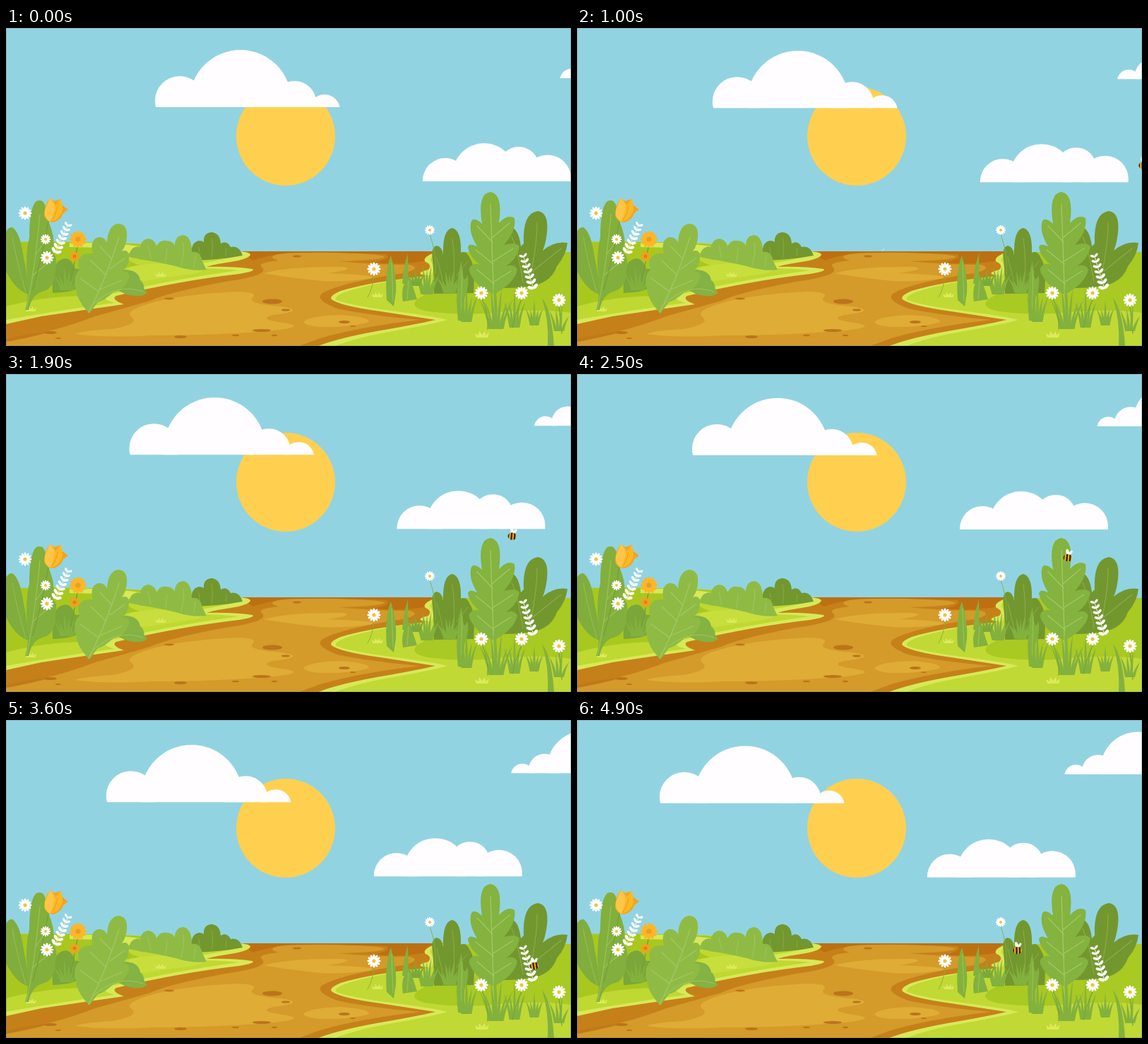
An HTML page with a canvas that plays this animation: 800 by 450 pixels, repeating every 5 s.

```html
<!DOCTYPE html>
<html lang="en">
<head>
<meta charset="utf-8">
<title>Meadow</title>
<style>
html, body { margin: 0; width: 100%; height: 100%; overflow: hidden; background: #92d3e2; }
canvas { display: block; width: 800px; height: 450px; }
</style>
</head>
<body>
<canvas id="stage" width="800" height="450"></canvas>
<script>
const W = 800, H = 450, LOOP = 5000, TAU = Math.PI * 2;
const view = document.getElementById('stage').getContext('2d');
const ground = document.createElement('canvas');
ground.width = W;
ground.height = H;
let c = ground.getContext('2d');

const DARK = '#73972f', LEAF = '#84b33f', LIGHT = '#8fbb45', BLADE = '#83b13e', VEIN = '#a3c866';

function fill(color, d) {
  c.fillStyle = color;
  c.fill(new Path2D(d));
}

function line(color, width, d) {
  c.strokeStyle = color;
  c.lineWidth = width;
  c.lineCap = 'round';
  c.stroke(new Path2D(d));
}

function oval(color, x, y, rx, ry, turn = 0) {
  c.fillStyle = color;
  c.beginPath();
  c.ellipse(x, y, rx, ry, turn, 0, TAU);
  c.fill();
}

function blade(color, x, y, tipX, tipY, w) {
  const mx = (x + tipX) / 2, my = (y + tipY) / 2, lean = (tipX - x) * 0.25;
  fill(color, `M${x - w / 2} ${y}Q${mx - w / 2 - lean} ${my} ${tipX} ${tipY}Q${mx + w / 2 - lean} ${my} ${x + w / 2} ${y}Z`);
}

function fan(color, x, y, tall, wide, count) {
  for (let i = 0; i < count; i++) {
    const k = i / (count - 1) * 2 - 1;
    const h = tall * (1 - 0.35 * Math.abs(k) - 0.18 * (i % 2));
    blade(color, x + k * wide * 0.35, y, x + k * wide, y - h, 4.2);
  }
}

function tuft(x, y, s = 1) {
  fill('#dcea5c', `M${x - 8 * s} ${y}L${x - 10 * s} ${y - 6 * s}L${x - 5 * s} ${y - 3 * s}L${x - 4 * s} ${y - 9 * s}
    L${x} ${y - 4 * s}L${x + 4 * s} ${y - 9 * s}L${x + 5 * s} ${y - 3 * s}L${x + 10 * s} ${y - 7 * s}L${x + 8 * s} ${y}Z`);
}

function petals(x, y, r, count, color, w) {
  for (let i = 0; i < count; i++) {
    const a = i * TAU / count;
    oval(color, x + Math.cos(a) * r * 0.6, y + Math.sin(a) * r * 0.6, r * 0.4, r * w, a);
  }
}

function daisy(x, y, r) {
  petals(x, y, r, 12, '#fff', 0.17);
  oval('#fff', x, y, r * 0.65, r * 0.65);
  oval('#f6bf3c', x, y, r * 0.27, r * 0.27);
}

function sprig(x, y, tipX, tipY) {
  line('#eef5e4', 1, `M${x} ${y}L${tipX} ${tipY}`);
  const a = Math.atan2(tipY - y, tipX - x);
  for (let i = 0; i < 7; i++) {
    const k = i / 6, s = 1 - k * 0.25;
    const px = x + (tipX - x) * k, py = y + (tipY - y) * k;
    for (const side of [-1, 1]) {
      const b = a + side * 0.95;
      oval('#fff', px + Math.cos(b) * 4.6 * s, py + Math.sin(b) * 4.6 * s, 4.3 * s, 2.2 * s, b);
    }
  }
}

function road() {
  fill('#c68019', 'M0 316H620V450H0Z');
  fill('#bd7011', 'M330 316H615V325Q570 337 520 332Q548 326 538 320Q480 318 400 318Q370 322 350 329Z');
  fill('#d49a2a', `M386 320Q430 316 490 319Q532 320 536 324Q528 329 470 330Q520 335 572 335
    Q590 340 562 347Q470 361 447 376Q437 385 469 397Q510 406 586 413Q500 423 445 439L415 450
    H0V441Q70 430 126 408Q166 397 204 386Q230 374 310 359Q376 350 362 338Q355 332 386 329Q368 324 386 320Z`);
  fill('#dfac36', `M98 433Q110 428 150 426Q190 419 178 409Q166 401 202 390Q245 377 326 373
    Q360 373 348 383Q345 391 390 394Q428 400 379 406Q352 412 398 418Q424 423 380 428Q300 435 206 435Q140 439 98 433Z`);
  fill('#dfac36', 'M365 347Q400 337 476 338Q498 341 456 347Q540 350 512 355Q466 361 437 357Q390 352 365 347Z');
  fill('#dfac36', 'M421 416Q430 407 474 406Q515 409 514 416Q490 424 447 423Q424 422 421 416Z');
  fill('#c0791b', 'M0 440Q36 431 67 429Q26 440 0 444Z');
  [[377, 387, 14, 3.4], [396, 399, 6, 1.6], [231, 383, 7, 1.4], [247, 437, 9, 2], [63, 431, 9, 2],
   [362, 428, 13, 2], [380, 435, 4, 1.2], [74, 439, 4, 1], [479, 416, 8, 2], [325, 435, 5, 1.2],
   [412, 323, 6, 1.6], [491, 422, 4, 1]].forEach(s => oval('#bb741b', ...s));
}

function leftBank() {
  fill('#d7e958', `M0 303Q120 301 205 306L330 316Q346 317 346 321Q343 327 318 331Q292 335 284 338
    Q320 337 349 341Q354 344 330 348Q250 357 156 379Q148 384 167 391Q110 399 50 408L0 419Z`);
  fill('#bfd832', `M0 303Q120 301 205 306L326 316Q340 319 326 323Q302 329 270 334Q252 338 270 340
    Q304 340 330 343Q245 354 150 376Q128 382 154 389Q90 397 0 413Z`);
  fill('#a8c81f', `M0 303Q90 301 180 305L318 317Q280 328 240 329Q205 328 172 323Q170 330 190 336
    Q160 339 120 348Q160 354 190 360Q150 371 110 379Q50 380 0 394Z`);
  fill('#d7e958', 'M90 304Q150 303 190 309Q184 314 176 319Q150 310 90 310Z');
  fill('#c8de3d', 'M176 338Q214 329 265 338Q292 343 262 348Q220 354 196 358Q160 350 176 338Z');
  tuft(219, 352, 0.8);
  tuft(35, 401, 0.8);
}

function rightBank() {
  fill('#d7e958', `M800 317H608Q588 325 594 331Q604 335 598 342Q574 348 600 351Q520 358 474 372
    Q457 379 461 384Q472 393 530 401L608 413Q578 420 525 429Q470 439 442 450H800Z`);
  fill('#c1d934', `M800 318H614Q596 326 602 331Q609 339 602 350Q520 360 479 374Q463 381 468 385
    Q490 393 545 400Q606 408 625 413Q600 420 548 429Q496 438 466 450H800Z`);
  fill('#a9c923', 'M800 317H622Q607 330 614 350Q608 370 582 384Q570 396 598 401Q650 408 710 401Q760 397 800 403Z');
  tuft(526, 381, 0.8);
  tuft(674, 438);
}

function farBushes() {
  fill(DARK, `M262 329Q260 303 273 301Q278 301 280 303Q279 290 291 289Q303 290 304 305
    Q313 300 318 310Q330 307 335 322Q305 328 262 329Z`);
  line('#8dac49', 0.8, 'M291 325Q294 308 291 298M311 322L312 312M275 326L273 310');
  fill(LIGHT, `M188 327Q187 300 201 298Q211 299 213 309Q218 299 227 301Q236 301 239 308
    Q239 294 251 293Q263 295 263 317Q275 315 278 330L284 342Q265 345 240 337Q210 330 188 327Z`);
  fill(LIGHT, 'M174 324Q175 310 188 309L194 328Z');
  line(VEIN, 0.8, 'M248 336Q253 318 251 304M226 332L228 312M205 326L201 308M266 338L268 323');
}

function leftPlants() {
  fill('#7ba63a', 'M66 375Q64 336 76 329Q91 320 98 341Q113 338 108 362Q102 374 66 375Z');
  fan(BLADE, 86, 371, 36, 20, 6);
  fill('#80ad3c', 'M0 288Q4 281 9 282Q20 289 25 325Q31 353 32 377Q14 372 0 344Z');
  line('#98bf56', 1, 'M9 296Q15 330 28 374');
  fill('#83af3c', `M27 399Q33 382 30 354Q27 320 33 296Q33 254 43 245Q56 240 57 262Q60 274 64 284
    Q70 302 66 318Q74 324 70 342Q70 369 51 373Q36 378 32 399Z`);
  line('#9cc25a', 1.2, 'M29 398Q40 349 48 264M38 350L60 332M43 319L60 296');

  fill('#84b243', 'M145 365Q153 344 169 342Q188 343 190 357Q195 360 196 370L200 375Q190 383 168 376Z');
  fill(LIGHT, `M118 404Q101 386 99 370Q94 350 104 342Q98 326 111 320Q121 318 123 319
    Q118 301 130 296Q140 295 143 304Q144 280 158 277Q173 277 171 297Q170 308 164 316Q174 312 174 324
    Q174 339 164 344Q176 344 174 354Q168 371 152 374Q139 386 130 388Z`);
  line(VEIN, 1.2, 'M117 402Q141 357 160 296M131 373L105 354M142 350L120 329M150 327L133 309M133 370L164 357M147 341L168 326');
  line(VEIN, 0.9, 'M124 390Q157 360 194 373');

  line('#75a03a', 1.4, 'M60 274Q52 320 38 370M102 305L92 358');
  // Tulip
  fill('#f5a51a', 'M54 266Q54 250 62 241L68 245L77 242L79 250L88 257L81 262Q78 272 67 275Q58 275 54 266Z');
  fill('#fbb926', 'M62 241Q69 246 70 251L77 242Q82 251 79 261Q74 272 64 274Q54 271 55 260Q56 250 62 241Z');
  fill('#fdc648', 'M62 241Q70 248 68 258Q66 268 62 274Q53 268 55 258Z');
  line('#e9981c', 0.9, 'M73 252Q71 264 65 272M80 253L84 256');

  petals(102, 299, 12, 12, '#fbb728', 0.2);
  oval('#fbb728', 102, 299, 8, 8);
  oval('#f09c22', 102, 299, 3.6, 3.6);
  petals(97, 323, 7.5, 8, '#f3a01e', 0.24);
  oval('#df8018', 97, 323, 2.5, 2.5);
  sprig(70, 318, 87, 280);
  daisy(27, 262, 9.5);
  daisy(56, 299, 7.5);
  daisy(58, 325, 9.5);
}

function rightPlants() {
  fill(DARK, `M606 376Q606 350 604 328Q601 310 610 308Q617 309 619 321Q618 285 632 283
    Q645 286 644 318Q652 314 657 326Q665 337 662 375Z`);
  line('#8dac49', 1, 'M633 371Q637 330 632 298M618 356L610 324M638 350L654 330');
  fill(DARK, `M704 368Q701 289 714 281Q726 284 729 309L733 305Q731 262 753 259Q769 261 766 290
    Q764 306 760 315Q776 301 795 304Q793 322 780 337Q775 352 762 359Q747 368 704 368Z`);
  line('#8dac49', 1.1, 'M740 362Q752 310 752 275M746 344L786 312M732 360Q726 318 716 295');
  fill(LEAF, `M691 377Q667 367 658 349Q652 338 663 334Q669 333 672 336Q657 325 654 311Q655 303 667 309
    Q654 288 659 273Q663 267 674 277Q667 234 686 232Q704 235 698 276Q710 263 720 269
    Q723 287 705 307Q721 302 727 309Q724 326 708 337Q720 333 724 342Q720 361 691 377Z`);
  line(VEIN, 1.3, 'M692 422Q689 330 686 250M689 303L667 280M690 334L665 314M691 362L667 342M688 297L713 276M690 330L718 312M691 359L715 344');
  line(LEAF, 3.5, 'M692 371L694 424');

  // Near blades at the path edge
  fan(BLADE, 596, 377, 45, 18, 7);
  fan('#7aa83a', 580, 365, 27, 13, 5);
  fan(BLADE, 628, 375, 35, 18, 7);
  blade(BLADE, 565, 362, 569, 319, 8);
  fill(BLADE, 'M539 385Q536 343 545 322Q554 352 552 375L549 394Z');
  fill(BLADE, 'M562 387Q558 364 571 351Q577 368 582 384Z');
  line(VEIN, 0.8, 'M546 332L548 386M570 358L568 384');
  line('#8aad3c', 0.9, 'M521 349Q520 367 512 381M600 292Q610 319 608 348');
  fill(BLADE, 'M640 414Q635 365 645 329Q647 368 653 350Q657 361 649 383L648 415Z');
  line(VEIN, 0.8, 'M646 342L644 410');

  fan(BLADE, 652, 416, 55, 15, 5);
  fan(BLADE, 694, 426, 66, 24, 7);
  fan(BLADE, 720, 424, 56, 15, 5);
  fan(BLADE, 748, 421, 36, 12, 5);
  line('#79a63a', 1.4, 'M673 381Q684 403 682 426M731 382Q721 404 717 424M783 394L787 432');
  fill(BLADE, 'M767 450Q769 414 759 382Q773 400 776 450Z');
  fan(BLADE, 783, 429, 46, 14, 4);
  sprig(747, 369, 733, 324);
  daisy(600, 286, 7.2);
  daisy(521, 341, 9.6);
  daisy(673, 375, 9.6);
  daisy(730, 375, 9.6);
  daisy(783, 385, 9.6);
}

road();
leftBank();
rightBank();
farBushes();
leftPlants();
rightPlants();
c = view;

const cloudA = [[35, -9, 35], [121, -9, 72], [197.5, -6, 31], [240, 4, 22]];
const cloudB = [[32, -1, 32], [87, -9.5, 44.5], [136, -20.5, 28.5], [177, -4.5, 33]];

function cloud(lobes, x, y, sx = 1, sy = 1) {
  c.save();
  c.translate(x, y);
  c.scale(sx, sy);
  c.beginPath();
  c.rect(-10, -100, 300, 100);
  c.clip();
  for (const [lx, ly, r] of lobes) oval('#fffdff', lx, ly, r, r);
  c.restore();
}

// time, x, y, tilt
const flight = [[900, 815, 190, 0], [1400, 753, 208, 0.05], [2500, 695, 259, 0.1],
  [3600, 748, 347, -0.15], [4400, 672, 340, 0.1], [5000, 614, 322, -0.05]];

function slope(i, k) {
  const a = flight[Math.max(0, i - 1)], b = flight[Math.min(flight.length - 1, i + 1)];
  return (b[k] - a[k]) / (b[0] - a[0]);
}

function along(t, k) {
  let i = 0;
  while (i < flight.length - 2 && t >= flight[i + 1][0]) i++;
  const a = flight[i], b = flight[i + 1], span = b[0] - a[0], u = (t - a[0]) / span;
  const s = u * u * (3 - 2 * u);
  return a[k] * (1 - s) + b[k] * s + span * u * (1 - u) * ((1 - u) * slope(i, k) - u * slope(i + 1, k));
}

function bee(t) {
  if (t < flight[0][0]) return;
  c.save();
  c.translate(along(t, 1), along(t, 2));
  c.rotate(along(t, 3));
  oval('#fff', -1, -6.5, 2.2, 4.8, -0.25);
  oval('#eef8f8', 3, -6, 1.9, 4.3, 0.6);
  c.beginPath();
  c.ellipse(0, 1, 6.3, 5.2, 0, 0, TAU);
  c.clip();
  oval('#f9b51c', 0, 1, 6.3, 5.2);
  c.fillStyle = '#38260d';
  for (const x of [-7, -2.4, 2]) c.fillRect(x, -6, 2.5, 14);
  c.restore();
}

const swirl = new Path2D('M434 314C414 300 397 288 397 267C398 249 438 243 470 243C500 243 527 247 527 258C527 279 521 293 502 306');
const swirlLen = 300;

function trail(t) {
  if (t < 1000 || t > 1850) return;
  const head = Math.min(1, (t - 1000) / 400), tail = Math.max(0, (t - 1420) / 430);
  c.save();
  c.lineCap = 'butt';
  c.strokeStyle = 'rgba(255,255,255,.57)';
  c.lineWidth = 5.5;
  if (head < 1 || tail > 0) {
    c.setLineDash([Math.max(0, head - tail) * swirlLen, 999]);
    c.lineDashOffset = -tail * swirlLen;
  }
  c.stroke(swirl);
  if (head === 1 && tail === 0) {
    c.setLineDash([1.2, 1.3]);
    c.strokeStyle = 'rgba(255,255,255,.3)';
    c.stroke(swirl);
  }
  c.restore();
}

function draw(t) {
  const dx = -0.0192 * t, dy = 0.00115 * t;
  c.fillStyle = '#92d3e2';
  c.fillRect(0, 0, W, H);
  oval('#ffd050', 396, 153, 70, 70);
  cloud(cloudA, 211 + dx, 112 + dy);
  cloud(cloudB, 590 + dx, 217 + dy);
  cloud(cloudA, 978 + dx, 71 + dy, -0.74, 0.74);
  c.drawImage(ground, 0, 0);
  trail(t);
  bee(t);
  c.strokeStyle = 'rgba(80,125,135,.35)';
  c.lineWidth = 1;
  c.strokeRect(0.5, 0.5, W - 1, H - 1);
}

const start = performance.now();
function tick() {
  draw((performance.now() - start) % LOOP);
  requestAnimationFrame(tick);
}
tick();
</script>
</body>
</html>
```
